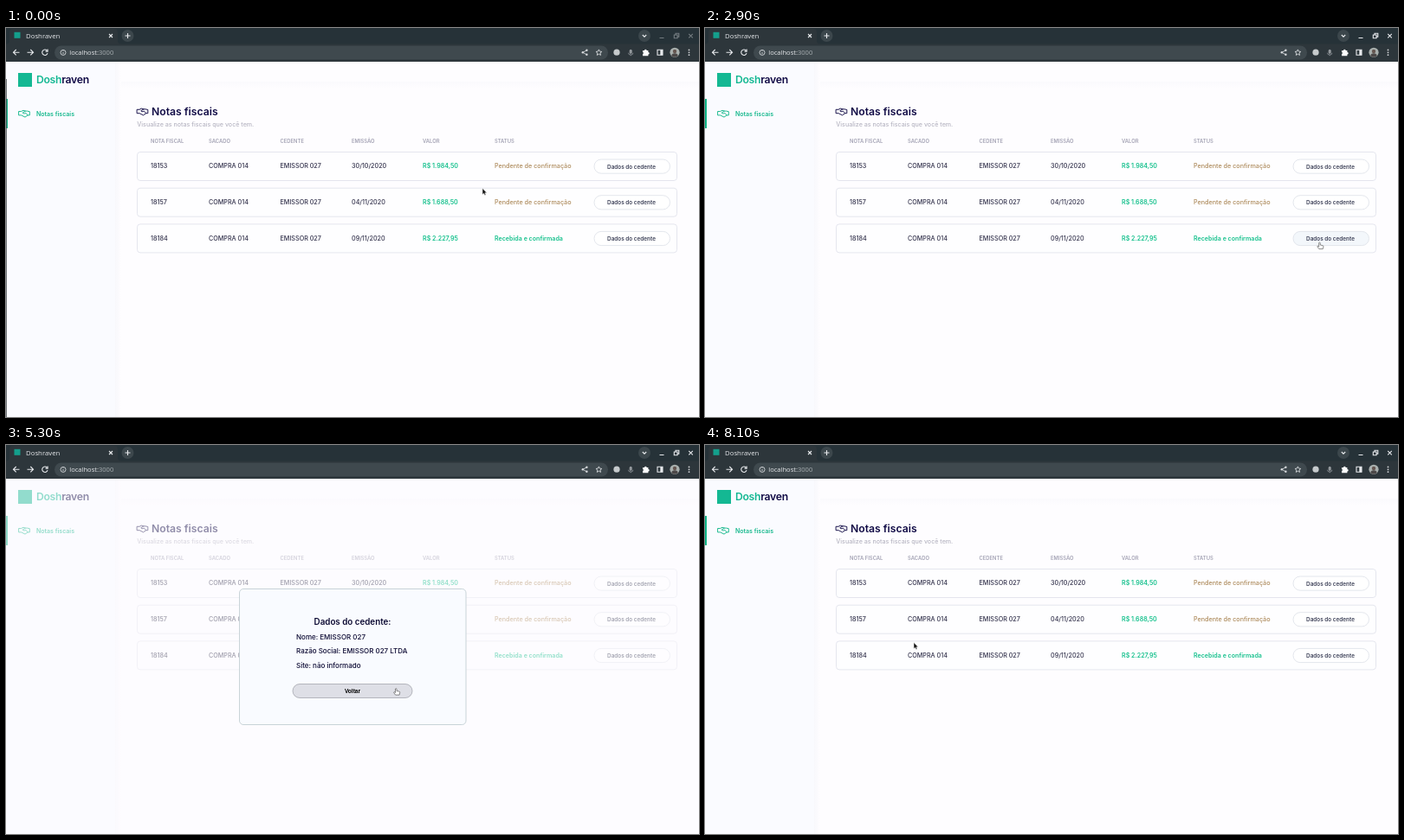
These frames come from a looping animation (800x450 px, 8300 ms). An HTML page:

```html
<!DOCTYPE html>
<html lang="pt-BR">
<head>
<meta charset="utf-8">
<title>Doshraven</title>
<style>
html, body { margin: 0; width: 100%; height: 100%; overflow: hidden; background: #fefdff }
svg { display: block; width: 100vw; height: 100vh; font: 500 7.2px Inter, sans-serif }
.line { fill: none; stroke: #e8eaed; stroke-width: 1.1 }
.thin { stroke-width: .8 }
.ui { font-family: "Open Sans", sans-serif; font-weight: 400; fill: #e8eaed }
.head { font-size: 5.85px; font-weight: 600; fill: #a3a2b4 }
.cell { fill: #33324c }
.green { fill: #14c08c; font-weight: 600; font-size: 7.1px }
.wait { fill: #ad8a5b }
.row { fill: #fefeff; stroke: #dfe0ea; stroke-width: .8 }
.pill { fill: #fff; stroke: #dce0e8; stroke-width: .8 }
.pill.hover { fill: #f3f7fb }
.label { font-size: 6.4px; font-weight: 600; fill: #3d4158; text-anchor: middle }
.navy { fill: #100a45 }
#back { fill: #fbfcff; stroke: #8f9199; stroke-width: .6 }
#back.hover { fill: #dedfe6 }
</style>
</head>
<body>
<svg viewBox="0 0 800 450">
  <defs>
    <linearGradient id="down" x2="0" y2="1">
      <stop stop-color="#fafafd"/><stop offset="1" stop-color="#fefdff"/>
    </linearGradient>
    <linearGradient id="right">
      <stop stop-color="#f8f8fc"/><stop offset="1" stop-color="#fefdff"/>
    </linearGradient>
    <g id="shake" fill="none" stroke-width=".95" stroke-linejoin="round" stroke-linecap="round">
      <path d="M.5 2H3L5.5 .8 8 1.6 10 1.6 12.8 2.2V6.4H10.6L7.5 8.6 3.2 6.4H.5Z"/>
      <path d="M8 1.6 4.8 3.4Q5.2 5 7.2 4.3L8.4 3.8 10.6 6.4"/>
    </g>
  </defs>

  <g id="page">
    <rect y="39" width="800" height="411" fill="#fefdff"/>
    <rect x="127" y="62" width="673" height="8" fill="url(#down)"/>
    <rect y="39" width="126" height="411" fill="#fafbff"/>
    <rect x="126" y="39" width="7" height="411" fill="url(#right)"/>
    <rect y="82" width="2" height="34" fill="#0fb488"/>
    <rect x="14" y="52" width="16" height="16" fill="#14b893"/>
    <text x="35" y="63.6" font-size="12.2" font-weight="600" letter-spacing="-.3" fill="#14b893">Dosh<tspan class="navy">raven</tspan></text>
    <use href="#shake" x="14.5" y="94.5" stroke="#14b88c"/>
    <text x="35" y="101.8" font-size="7" font-weight="600" fill="#14b88c">Notas fiscais</text>
    <use href="#shake" x="151" y="92.3" stroke="#100a45"/>
    <text x="168" y="101.2" font-size="12.2" font-weight="600" class="navy">Notas fiscais</text>
    <text x="151.3" y="114" font-size="7.1" fill="#b6b5c2">Visualize as notas fiscais que você tem.</text>
    <g id="table"></g>
    <rect id="edge" y="59" width=".8" height="391" fill="#50555a"/>
  </g>

  <g id="modal">
    <rect y="39" width="800" height="411" fill="#fefcff" opacity=".54"/>
    <rect x="269.5" y="166.5" width="261.5" height="157" rx="4.5" fill="#f9fbff" stroke="#c3d0d4" stroke-width=".9"/>
    <g fill="#0c0a33" font-size="8">
      <text x="400" y="208.3" font-size="9.8" font-weight="600" text-anchor="middle">Dados do cedente:</text>
      <text x="335" y="224.6">Nome: EMISSOR 027</text>
      <text x="335" y="241.3">Razão Social: EMISSOR 027 LTDA</text>
      <text x="335" y="258">Site: não informado</text>
    </g>
    <rect id="back" x="331" y="276.5" width="138" height="16" rx="8"/>
    <text x="400" y="286.6" text-anchor="middle" style="font:700 6.5px 'Liberation Sans',Arial,sans-serif">Voltar</text>
  </g>

  <g id="browser">
    <rect width="800" height="19" fill="#263238"/>
    <path d="M0 18.5Q4 18.5 4 14.5V5Q4 1 8 1H125Q129 1 129 5V14.5Q129 18.5 133 18.5H800V39H0Z" fill="#2d363b"/>
    <rect x="9.5" y="4.8" width="7" height="7" fill="#149f8c"/>
    <text x="23" y="12" class="ui" font-size="7.8">Doshraven</text>
    <path class="line" d="M119 7l4 4m0-4l-4 4"/>
    <circle cx="140.5" cy="9" r="7" fill="#3c474c"/>
    <path class="line" d="M137.5 9h6M140.5 6v6"/>
    <circle cx="737" cy="9" r="7" fill="#3c474c"/>
    <path class="line" d="M734.8 8l2.2 2.2L739.2 8"/>
    <path id="buttons" class="line" d="M754.5 11.5h5M771.3 8h3.8v3.8h-3.8zM773 8V6.3h3.8v3.8h-1.7M788.2 6.8l4.6 4.6m0-4.6l-4.6 4.6"/>
    <rect x="56" y="20.5" width="639" height="16" rx="8" fill="#3f494e"/>
    <path class="line" d="M15.5 28.2H8.5M11.7 25l-3.2 3.2 3.2 3.2M24.5 28.2h7M28.3 25l3.2 3.2-3.2 3.2"/>
    <path class="line" d="M47.3 26.1A3.2 3.2 0 1 0 48 29.2M48.1 24.6v2.5h-2.5"/>
    <circle class="line thin" cx="66" cy="28.4" r="3"/>
    <path class="line thin" d="M66 28v2M66 26.5v.7"/>
    <text x="73.3" y="31" class="ui" font-size="7.55">localhost:<tspan fill="#a9b0b3">3000</tspan></text>
    <path class="line thin" d="M670.3 25.8l-4.4 2.5 4.4 2.5"/>
    <g fill="#d6d8db">
      <circle cx="670.4" cy="25.8" r="1.2"/><circle cx="665.8" cy="28.3" r="1.2"/><circle cx="670.4" cy="30.8" r="1.2"/>
      <circle cx="705" cy="28.2" r="3.6" fill="#c6cacc"/>
      <rect x="719.7" y="24.7" width="3" height="5" rx="1.5" fill="#94999d"/>
      <path d="M735 26h2a1.3 1.3 0 0 1 2.6 0h1.8v2a1.3 1.3 0 0 1 0 2.6v1.6H735v-2a1.3 1.3 0 0 0 0-2.4Z" fill="#fff"/>
      <circle cx="788.5" cy="25.4" r=".9"/><circle cx="788.5" cy="28.3" r=".9"/><circle cx="788.5" cy="31.2" r=".9"/>
    </g>
    <path class="line thin" d="M684.4 24.9l1 2.2 2.4.3-1.8 1.6.5 2.4-2.1-1.2-2.1 1.2.5-2.4-1.8-1.6 2.4-.3z"/>
    <path class="line thin" d="M718.5 28.8q0 2.3 2.7 2.3t2.7-2.3M721.2 31v1.2" style="stroke:#94999d"/>
    <path class="line" d="M752 25.3h6v6h-6z"/>
    <path d="M755.3 25.3h2.7v6h-2.7z" fill="#e8eaed"/>
    <circle cx="772" cy="28.3" r="5.6" fill="#a9b0ae"/>
    <path d="M768.2 32.3q.4-3 3.8-3t3.8 3a5.6 5.6 0 0 1-7.6 0" fill="#4c4848"/>
    <circle cx="772" cy="27" r="2.2" fill="#655650"/>
  </g>

  <path id="arrow" d="M0 0V7.2L1.6 5.7 2.7 8.1 4 7.5 2.9 5.2H5.1Z" fill="#111" stroke="#fff" stroke-width=".5"/>
  <path id="hand" d="M-.8.5Q0-.4.7.5V3L3.6 3.6Q4.6 3.9 4.4 5L3.8 7.6H-.7L-2.7 4.9Q-2.6 3.9-1.6 4.4L-.8 5Z" fill="#fff" stroke="#444" stroke-width=".6"/>
</svg>
<script>
const $ = id => document.getElementById(id);
const LOOP = 8300, STEP = 100, FOCUS = 400, OPEN = 3600, CLOSE = 6400;
const cols = [167, 234, 316.5, 399, 481, 564];
const heads = ['NOTA FISCAL', 'SACADO', 'CEDENTE', 'EMISSÃO', 'VALOR', 'STATUS'];
const rows = [
  ['18153', '30/10/2020', 'R$ 1.984,50'],
  ['18157', '04/11/2020', 'R$ 1.688,50'],
  ['18184', '09/11/2020', 'R$ 2.227,95', true]
];
const text = (x, y, cls, s) => `<text x="${x}" y="${y}" class="${cls}">${s}</text>`;

let table = heads.map((h, i) => text(cols[i], 133, 'head', h)).join('');
rows.forEach(([id, date, value, done], i) => {
  const y = 143.5 + i * 41.7;
  const cells = [id, 'COMPRA 014', 'EMISSOR 027', date, value,
    done ? 'Recebida e confirmada' : 'Pendente de confirmação'];
  const styles = ['cell', 'cell', 'cell', 'cell', 'green', done ? 'green' : 'wait'];
  table += `<rect class="row" x="151.5" y="${y}" width="623" height="33" rx="3.5"/>` +
    cells.map((s, k) => text(cols[k], y + 18.7, styles[k], s)).join('') +
    `<rect class="pill" x="679" y="${y + 8.5}" width="87.5" height="16.2" rx="8.1"/>` +
    text(722, y + 19, 'label', 'Dados do cedente');
});
$('table').innerHTML = table;
const pills = [...document.querySelectorAll('.pill')];

// pointer stops: time, x, y
const path = [
  [0, 550, 185.5], [1100, 550, 185.5], [1500, 571, 138], [2000, 730, 10], [2100, 735, 10],
  [2400, 140, 97], [2700, 600, 205], [2900, 709.5, 248], [3100, 714, 244],
  [4000, 714, 244], [4900, 564.5, 253], [5300, 450.3, 281.5], [5600, 427.5, 287],
  [6500, 427.5, 287], [6900, 690, 270], [7200, 703, 281], [7700, 20, 56], [8100, 241, 228.5], [LOOP, 241, 228.5]
];

function pointer(t) {
  const i = path.findIndex(p => p[0] > t);
  const [t0, x0, y0] = path[i - 1], [t1, x1, y1] = path[i];
  const k = (t - t0) / (t1 - t0);
  return [x0 + (x1 - x0) * k, y0 + (y1 - y0) * k];
}

function inside(el, x, y) {
  const [l, t, w, h] = ['x', 'y', 'width', 'height'].map(a => +el.getAttribute(a));
  return x >= l && x <= l + w && y >= t && y <= t + h;
}

const show = (id, on) => $(id).style.display = on ? '' : 'none';

function draw(now) {
  const t = Math.floor(now % LOOP / STEP) * STEP;
  const [x, y] = pointer(t);
  const open = t >= OPEN && t < CLOSE;
  let over = false;
  for (const el of [...pills, $('back')]) {
    const hover = open == (el.id == 'back') && inside(el, x, y);
    el.classList.toggle('hover', hover);
    over = over || hover;
  }
  show('modal', open);
  show('edge', t < FOCUS);
  $('buttons').style.opacity = t < FOCUS ? .4 : 1;
  for (const id of ['arrow', 'hand']) {
    show(id, over == (id == 'hand'));
    $(id).setAttribute('transform', `translate(${x} ${y})`);
  }
}

let start;
function tick(now) {
  start ??= now;
  draw(now - start);
  requestAnimationFrame(tick);
}
draw(0);
requestAnimationFrame(tick);
</script>
</body>
</html>
```
